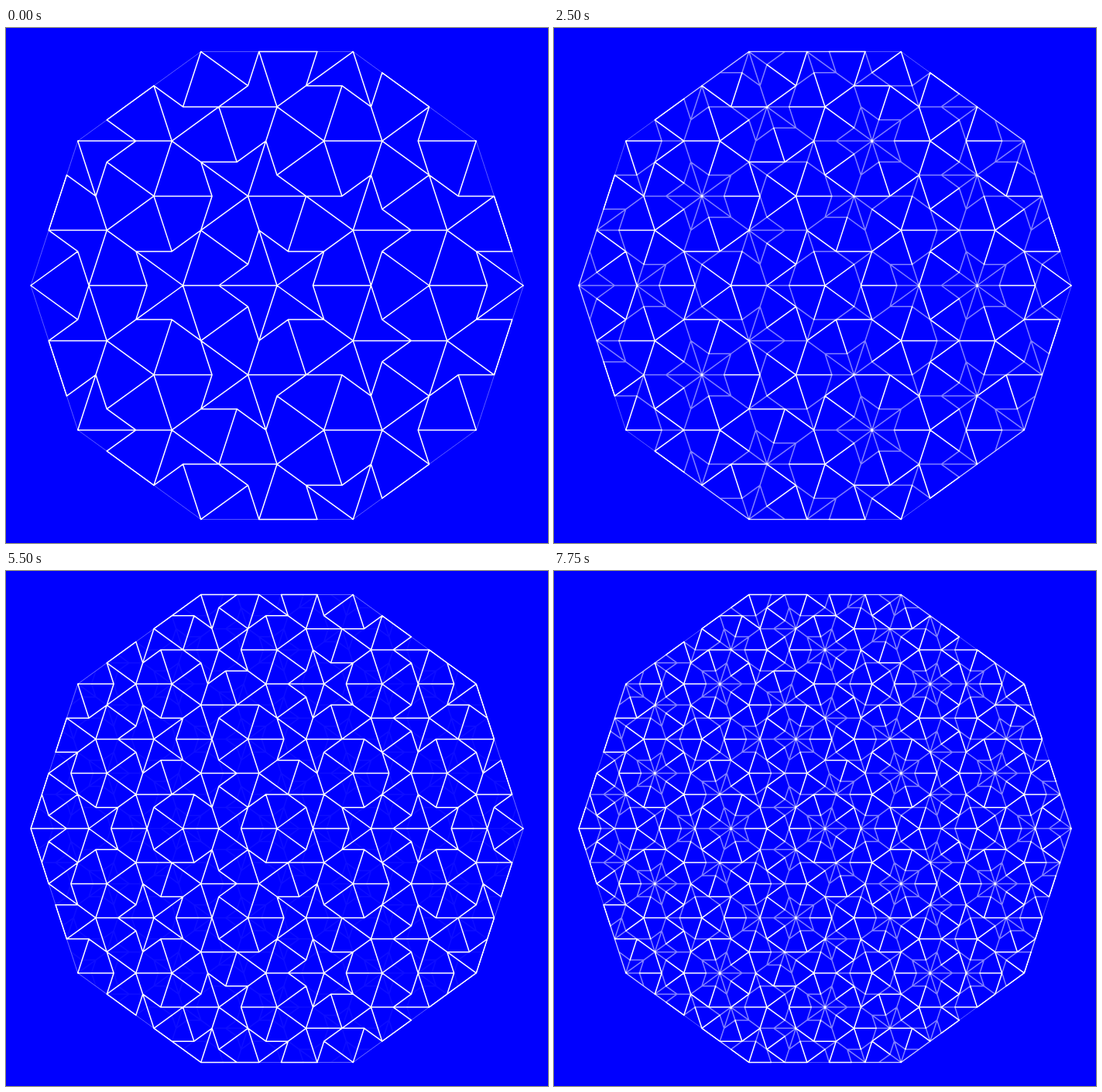
Write an HTML page with a canvas that moves like this. It is 700 px wide and 666 px high and loops after 8000 ms.

```html
<!DOCTYPE html>
<html>
<head>
<meta charset="utf-8">
<style>
  html, body { margin: 0; height: 100%; overflow: hidden; background: #00f; }
  canvas { display: block; }
</style>
</head>
<body>
<canvas id="stage" width="700" height="666"></canvas>
<script>
const ctx = document.getElementById('stage').getContext('2d');
const PHI = (1 + Math.sqrt(5)) / 2;
const CX = 350, CY = 333, RADIUS = 318;
const STEP = 250, LOOP = 8000, FADE_STEPS = 20;

const spoke = k => [
  CX + RADIUS * Math.cos(k * Math.PI / 5),
  CY - RADIUS * Math.sin(k * Math.PI / 5)
];
const mix = (p, q, f) => [p[0] + (q[0] - p[0]) * f, p[1] + (q[1] - p[1]) * f];

// Half tiles [kind, a, b, c]: a-b and b-c are tile edges, a-c is the mirror axis.
function split([kind, a, b, c]) {
  if (kind === 'kite') {
    const p = mix(a, c, 1 / PHI), q = mix(a, b, 1 / PHI ** 2);
    return [['dart', a, p, q], ['kite', b, q, p], ['kite', b, c, p]];
  }
  const x = mix(a, b, 1 / PHI);
  return [['kite', a, x, c], ['dart', b, c, x]];
}

function edges(tiles) {
  const path = new Path2D();
  for (const [, a, b, c] of tiles) {
    path.moveTo(...a);
    path.lineTo(...b);
    path.lineTo(...c);
  }
  return path;
}

// Level 0 is a sun of five kites filling the decagon.
let tiles = [];
const outline = new Path2D();
for (let k = 0; k < 10; k++) {
  const odd = k % 2;
  tiles.push(['kite', [CX, CY], spoke(k + 1 - odd), spoke(k + odd)]);
  outline.lineTo(...spoke(k));
}
outline.closePath();

const levels = [];
for (let n = 0; n <= 5; n++) {
  levels.push(edges(tiles));
  tiles = tiles.flatMap(split);
}

function stroke(path, alpha, width) {
  ctx.globalAlpha = alpha;
  ctx.lineWidth = width;
  ctx.stroke(path);
}

function draw(now) {
  const step = Math.floor(now % LOOP / STEP);
  const cycle = FADE_STEPS + 1;
  const level = 3 + Math.floor(step / cycle);
  const u = step % cycle / FADE_STEPS;

  ctx.globalCompositeOperation = 'source-over';
  ctx.globalAlpha = 1;
  ctx.fillStyle = '#00f';
  ctx.fillRect(0, 0, 700, 666);

  // Additive blending keeps edges shared by both levels fully white.
  ctx.globalCompositeOperation = 'lighter';
  ctx.strokeStyle = '#fff';
  ctx.lineJoin = ctx.lineCap = 'round';
  stroke(outline, 0.35, 1);
  stroke(levels[level], 1 - u, 1.5);
  stroke(levels[level + 1], u, 1.5);
}

const start = performance.now();
function tick() {
  draw(performance.now() - start);
  requestAnimationFrame(tick);
}
tick();
</script>
</body>
</html>
```
